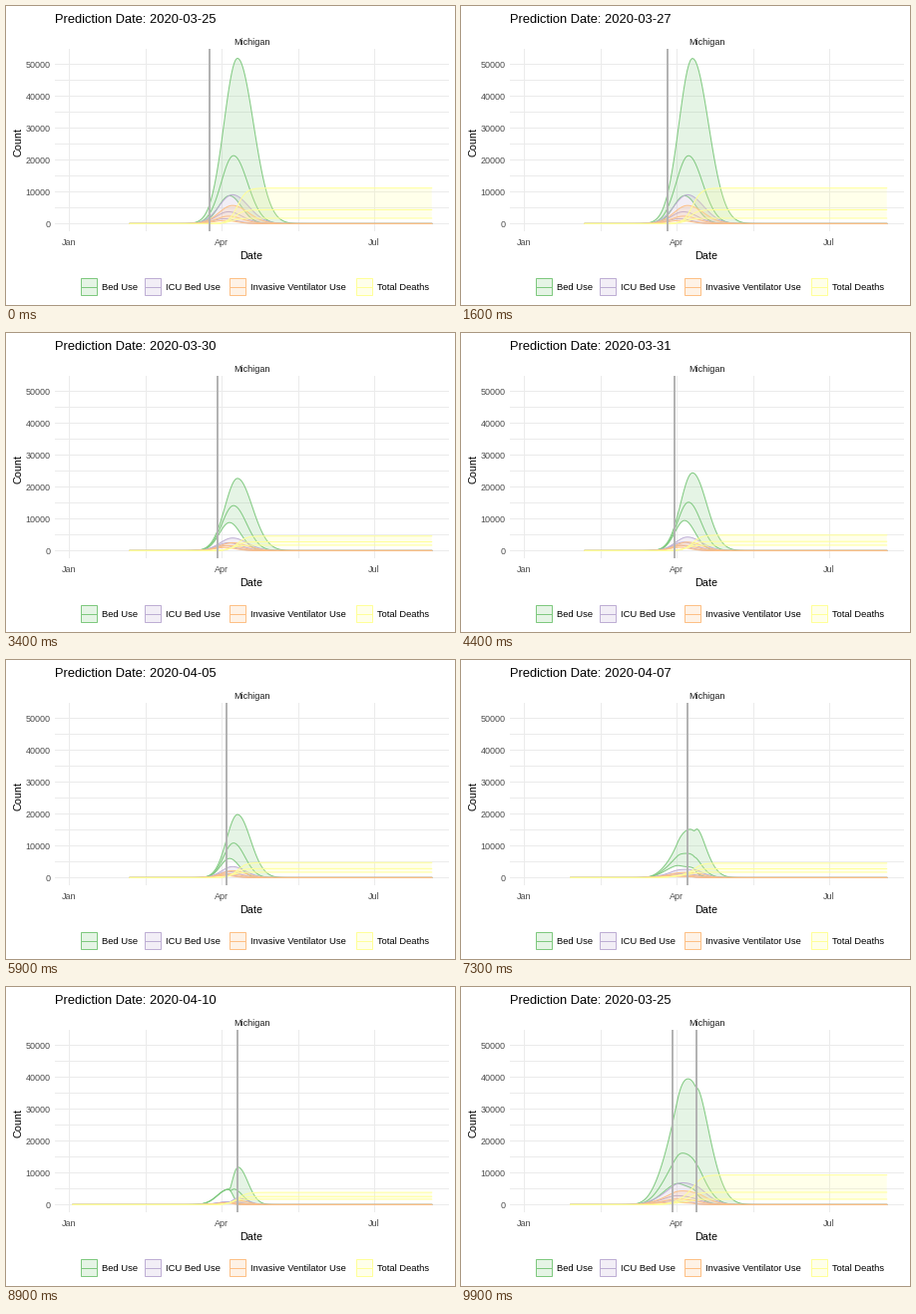
Recreate the animation shown at these times as a matplotlib script. Size 450x300 px, loop 10 s.

```python
import matplotlib as mpl
import matplotlib.pyplot as plt
import numpy as np
from matplotlib.animation import FuncAnimation
from matplotlib.patches import Rectangle

mpl.rcParams["font.family"] = "Liberation Sans"
mpl.rcParams["path.simplify"] = False

W, H, DPI = 450, 300, 100
PX = 72 / DPI
LEFT, RIGHT, TOP, BOTTOM = 49, 444, 43, 226
COLORS = ["#7FC97F", "#BEAED4", "#FDC086", "#FFFF99"]
NAMES = ["Bed Use", "ICU Bed Use", "Invasive Ventilator Use", "Total Deaths"]
GRID, MARK = "#EBEBEB", "#B3B3B3"

# Day of the year of each prediction, and the forecast it shows
DAYS = [84, 85, 86, 88, 89, 90, 91, 95, 97, 98, 100, 103]
FORECAST = [0, 0, 0, 1, 2, 3, 4, 5, 5, 6, 7, 8]
STARTS = [5 + 8 * i + min(i, 4) for i in range(len(DAYS))]
STEPS = 4

# Peak bed use (low, high) of the early forecasts; total deaths (high) of all
BEDS = [(8800, 52000), (8400, 22000), (9000, 23000),
        (9500, 24500), (9200, 22500), (5000, 19000)]
DEATHS = [11200, 4300, 4700, 4900, 4900, 4700, 4200, 3900, 3700]
SHARE = {1: 0.175, 2: 0.11}

NARROW = np.arange(36, 217)
WIDE = np.arange(2, 217)


def xpos(day):
    return 63.6 + 1.681 * day


def ypos(count):
    return 218.4 - 0.00319 * count


def date_text(day):
    return f"03-{day - 59:02}" if day < 91 else f"04-{day - 90:02}"


def spread(low, high):
    return low, np.sqrt(low * high), high


def bell(x, centre, height, left, right):
    z = (x - centre) / np.where(x < centre, left, right)
    return height * np.exp(-z * z / 2)


def early_beds(x, n):
    k = 1 - 0.04 * n
    return [bell(x, 224 + 4 * i, h, (11 + 1.25 * i) * k, (12 + 2 * i) * k)
            for i, h in enumerate(spread(*BEDS[n]))]


def late_beds(x, n):
    k = 1 - 0.06 * (n - 7)
    past = bell(x, 223, 4900, 11, 4.5)
    mean = bell(x, 228, 5000, 4, 9)
    high = bell(x, 232.5, 12000, 6, 9.8)
    return [k * np.maximum(past, y) for y in (0, mean, high)]


def is_wide(n):
    return n >= len(BEDS)


def curves(x, n, group):
    """Low, mean and high counts of one group in forecast n."""
    if group == 3:
        return [h / (1 + np.exp(-(x - 226 - 3 * i) / 4.5))
                for i, h in enumerate(spread(1700, DEATHS[n]))]
    if is_wide(n):
        beds = late_beds(x, n)
    else:
        beds = early_beds(x + (5 if group else 0), n)
    return [SHARE.get(group, 1) * b for b in beds]


def match(narrow, wide, group):
    """Pair rows; the extra ones fall where the low curve is steepest."""
    x = xpos(NARROW)
    climb = np.abs(np.diff(curves(x, narrow, group)[0], prepend=0)).cumsum()
    rows = np.arange(len(x)) + (len(WIDE) - len(x)) * climb / climb[-1]
    return np.interp(np.arange(len(WIDE)), rows, x), xpos(WIDE)


def blend(a, b, t, group):
    if is_wide(a) == is_wide(b):
        xa = xb = xpos(WIDE if is_wide(a) else NARROW)
    elif is_wide(b):
        xa, xb = match(a, b, group)
    else:
        xb, xa = match(b, a, group)
    pairs = zip(curves(xa, a, group), curves(xb, b, group))
    return xa + (xb - xa) * t, [p + (q - p) * t for p, q in pairs]


fig = plt.figure(figsize=(W / DPI, H / DPI), dpi=DPI, facecolor="white")
ax = fig.add_axes([0, 0, 1, 1])
ax.set(xlim=(0, W), ylim=(H, 0))
ax.axis("off")


def label(x, y, s, size=9, color="black", ha="center", va="baseline", **kw):
    return ax.text(x, y, s, fontsize=size * PX, color=color, ha=ha, va=va, **kw)


def box(x, y, w, h, color, z=0):
    return ax.add_patch(Rectangle((x, y), w, h, fc=color, ec="none",
                                  aa=False, zorder=z))


def tint(color):
    return mpl.colors.to_rgba(color, 0.2)


for count in range(0, 55000, 5000):
    y = int(ypos(count))
    box(LEFT, y, RIGHT - LEFT, 1, GRID)
    if count % 10000 == 0:
        label(44.5, y + 4, str(count), color="#4D4D4D", ha="right")
for i in range(5):
    x = int(xpos(45.5 * i))
    box(x, TOP, 1, BOTTOM - TOP, GRID)
    if i % 2 == 0:
        label(x, 240, ("Jan", "Apr", "Jul")[i // 2], color="#4D4D4D")

title = label(49, 17, "", 12.85, ha="left")
label(246, 39, "Michigan", color="#1A1A1A")
label(246, 254, "Date", 10.8)
label(12, 136.5, "Count", 10.8, rotation=90, va="center")

fills, lines = [], []
for i, (color, name, x) in enumerate(zip(COLORS, NAMES, (74, 138, 223, 350))):
    ax.add_patch(Rectangle((x + 0.5, 272.5), 16, 17, lw=PX,
                           fc=tint(color), ec=color))
    ax.plot([x + 1, x + 16], [281.5] * 2, color=color, lw=PX)
    label(x + 22, 285, name, 9.4, ha="left")
    fills.append(ax.fill([0], [0], fc=tint(color), ec="none", zorder=2 + i)[0])
    lines.append([ax.plot([], [], color=color, lw=PX, zorder=2.5 + i)[0]
                  for _ in range(3)])
marker, ghost = (box(int(xpos(DAYS[-1])) - 1, TOP, 2, BOTTOM - TOP, MARK, 8)
                 for _ in range(2))


def phase(frame):
    """Current prediction, next one and progress between them."""
    if frame < STARTS[0]:
        return len(DAYS) - 1, 0, 1.0
    k = max(i for i, s in enumerate(STARTS) if s <= frame)
    return k, (k + 1) % len(DAYS), min(1.0, (frame - STARTS[k] + 1) / STEPS)


def draw(frame):
    a, b, t = phase(frame)
    title.set_text("Prediction Date: 2020-" + date_text(DAYS[b if t > 0.5 else a]))
    marker.set_x(int(xpos(DAYS[a] + (DAYS[b] - DAYS[a]) * t)) - 1)
    ghost.set_visible(b == 0 and t < 1)
    for group, fill in enumerate(fills):
        x, bands = blend(FORECAST[a], FORECAST[b], t, group)
        low, mean, high = map(ypos, bands)
        fill.set_xy(np.column_stack([np.r_[x, x[::-1]], np.r_[high, low[::-1]]]))
        for line, y in zip(lines[group], (low, mean, high)):
            line.set_data(x, y)
    return []


anim = FuncAnimation(fig, draw, frames=100, interval=100, repeat=True,
                     repeat_delay=0, blit=False)
plt.show()
```
